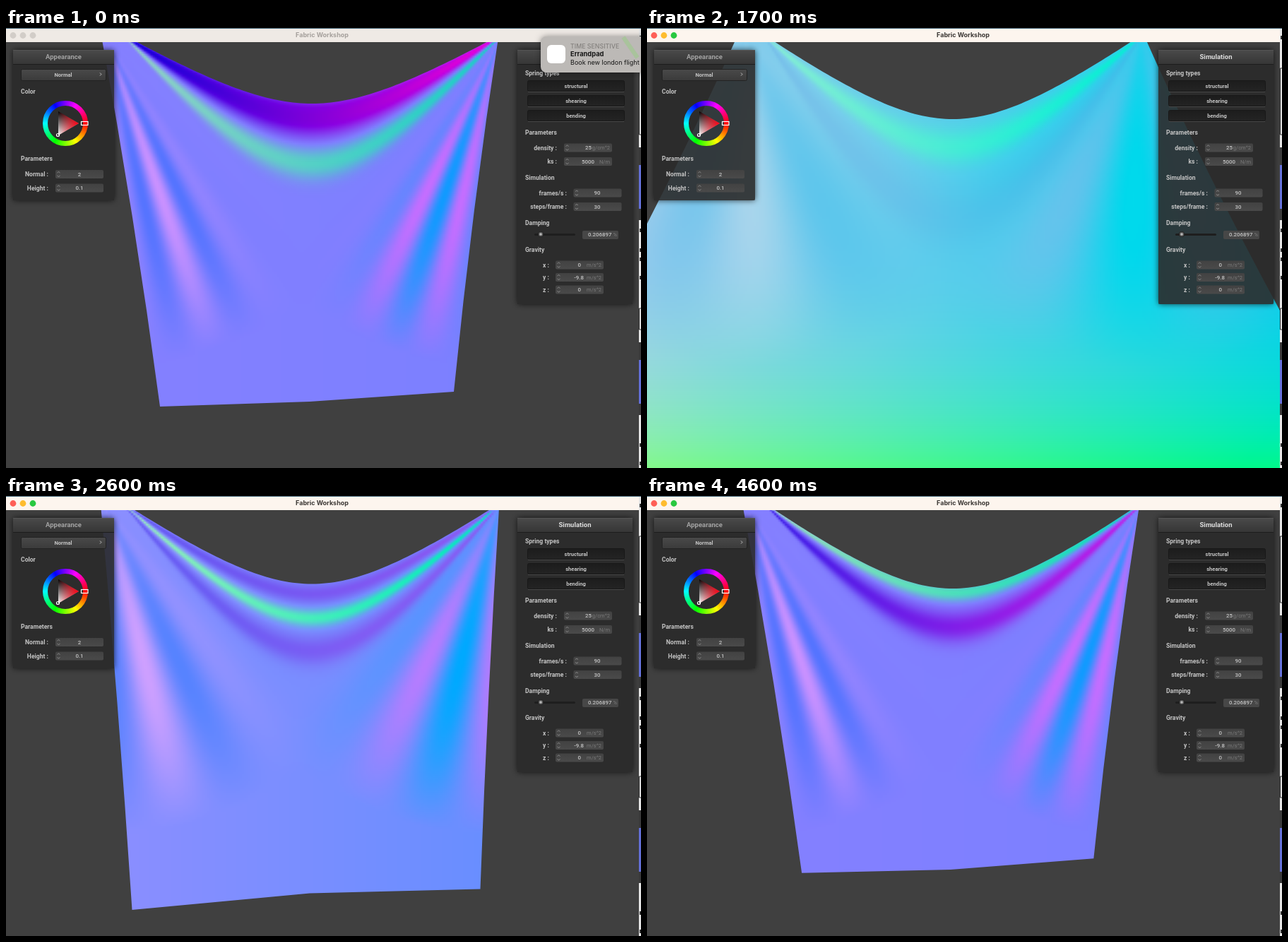
Recreate the animation shown at these times as an HTML page with a canvas. Size 899 by 623 pixels, loop 4700 ms.

```html
<!DOCTYPE html>
<html lang="en">
<head>
<meta charset="utf-8">
<title>Fabric Workshop</title>
<style>
html, body { margin: 0; width: 899px; height: 623px; overflow: hidden; background: #404040; }
canvas { display: block; }
</style>
</head>
<body>
<canvas id="stage" width="899" height="623"></canvas>
<script>
const ctx = document.getElementById('stage').getContext('2d');
const LOOP = 4700, STEP = 100, RESET = 1100, FOCUS = 900;
const UI = 'Roboto, "Open Sans", sans-serif', SYS = 'Inter, Roboto, sans-serif';
const LABEL = `700 8.6px ${UI}`, BUTTON = `700 7.6px ${UI}`;
const VALUE = `500 7.9px ${UI}`, UNIT = `400 7.5px ${UI}`;

// ---- Cloth poses ----
// left, mid, right: lower edge; bow: how far the sides curve inwards; rim: depth of the upper edge.
// crest, width, up, peak, low: the ripple below the rim (trough, crest, trough).
// fold, ray: strength and angle of the folds that fan out from the pins.
// tilt, spread, lean: how far the surface faces up, sideways, and up near the floor.
const hanging = {
  left: [218, 536], mid: [430, 529], right: [634, 515], bow: 7, rim: 131,
  crest: 137, width: 12, up: 0, peak: .9, low: .9,
  fold: 1, ray: .335, tilt: 0, spread: .06, lean: 0
};
const early = { ...hanging, rim: 107, crest: 192, width: 22, up: 1.5, peak: .75, low: 0 };
const level = {
  ...hanging, left: [-1500, 168], mid: [435, 226], right: [2400, 183], bow: 0, rim: 0,
  crest: 60, width: 25, peak: 0, low: 0, fold: 0, ray: 0, tilt: 1, spread: 0
};
const raised = { ...level, left: [-1500, -62], mid: [435, -4], right: [2400, -47] };
const falling = {
  ...hanging, left: [-303, 800], mid: [430, 800], right: [1133, 800], bow: 40, rim: 129,
  crest: 168, width: 25, peak: .3, low: .1, fold: .5, ray: .05, tilt: .6, spread: .55, lean: .3
};
const swung = {
  ...hanging, left: [139, 636], mid: [430, 596], right: [709, 598], bow: 0, rim: 127,
  crest: 174, width: 13, up: .5, low: 0, ray: .15, tilt: .23, spread: .4
};
const swaying = { ...hanging, rim: 122, crest: 172, width: 10, up: .5 };
const resting = { ...hanging, left: [220, 532], right: [631, 512] };

function mix(a, b, p) {
  if (typeof a === 'number') return a + (b - a) * p;
  if (Array.isArray(a)) return a.map((v, i) => mix(v, b[i], p));
  return Object.fromEntries(Object.keys(a).map(k => [k, mix(a[k], b[k], p)]));
}

const linear = p => p;
const track = [
  [0, RESET, early, mix(early, resting, .15), linear],
  [RESET, 1400, raised, level, p => p * p],
  [1400, 1700, level, falling, linear],
  [1700, 2200, falling, swung, p => 1 - (1 - p) ** 1.5],
  [2200, 3000, swung, swaying, linear],
  [3000, 3800, swaying, resting, linear],
  [3800, LOOP, resting, mix(resting, hanging, .5), linear]
];

function poseAt(t) {
  const [from, to, a, b, ease] = track.find(k => t < k[1]);
  return mix(a, b, ease((t - from) / (to - from)));
}

// ---- Cloth shading: the colour of each point is its surface normal ----
const CENTRE = 433, HALF = 270, PIN_Y = 8, SOFT = .526, SCALE = 3;
const LEFT_PIN = 140, RIGHT_PIN = 700;
const bell = d => Math.exp(-d * d);
// Shape of every hanging curve: 0 in the middle, 1 at the pins.
const rise = u => (Math.hypot(SOFT, u) - SOFT) / (Math.hypot(SOFT, 1) - SOFT);

function ripple(s, p) {
  return p.peak * bell((s - p.crest) / p.width)
    - p.up * bell((s - p.crest + 3 * p.width) / (1.2 * p.width))
    - p.low * bell((s - p.crest - 4 * p.width) / (1.8 * p.width));
}

function fan(dx, dy, p) {
  const r = Math.hypot(dx, dy);
  if (r > 470) return 0;
  const period = 2 * (.45 - p.ray), d = (Math.atan2(dx, dy) - p.ray) / period;
  return p.fold * Math.sin(Math.PI * r / 470) * Math.cos(2 * Math.PI * d) * bell(d / .75);
}

function normal(x, y, p) {
  const u = (x - CENTRE) / HALF, side = (x - 450) / 450;
  const depth = Math.abs(u) < 1 ? PIN_Y + (y - PIN_Y) / (1 - rise(u)) : Infinity;
  const wave = ripple(depth, p);
  const left = .55 * fan(x - LEFT_PIN, y - 10, p);
  const right = -.85 * fan(RIGHT_PIN - x, y - 10, p);
  const tilt = p.tilt + p.lean * Math.max(0, (y - 300) / 300) ** 2;
  return [
    -.55 * tilt - p.spread * side - .65 * u * wave - .45 * Math.max(wave, 0) + left + right,
    tilt + .85 * wave + .25 * (left - right),
    1 - 1.14 * tilt ** 4 - .4 * Math.abs(wave) - .2 * wave
  ];
}

const shade = document.createElement('canvas');
shade.width = 300;
shade.height = 208;
const shadeCtx = shade.getContext('2d');
const image = shadeCtx.createImageData(shade.width, shade.height);

function cloth(p) {
  for (let j = 0, k = 0; j < shade.height; j++)
    for (let i = 0; i < shade.width; i++) {
      for (const n of normal((i + .5) * SCALE, (j + .5) * SCALE, p)) image.data[k++] = 127.5 + 127.5 * n;
      image.data[k++] = 255;
    }
  shadeCtx.putImageData(image, 0, 0);

  const top = [133, 0], end = [699, 0];
  const bend = (a, b, shift) => [(a[0] + b[0]) / 2 + shift, (a[1] + b[1]) / 2];
  ctx.save();
  ctx.beginPath();
  ctx.moveTo(...top);
  for (let u = -1; u <= 1; u += .02)
    ctx.lineTo(CENTRE + HALF * u, p.rim - (p.rim - PIN_Y) * rise(u));
  ctx.lineTo(...end);
  ctx.quadraticCurveTo(...bend(end, p.right, -p.bow), ...p.right);
  ctx.lineTo(...p.mid);
  ctx.lineTo(...p.left);
  ctx.quadraticCurveTo(...bend(p.left, top, p.bow), ...top);
  ctx.clip();
  ctx.drawImage(shade, 0, 0, shade.width * SCALE, shade.height * SCALE);
  ctx.restore();
}

// ---- Interface ----
function text(s, x, y, colour = '#c4c4c4', align = 'left', font = LABEL) {
  ctx.font = font;
  ctx.fillStyle = colour;
  ctx.textAlign = align;
  ctx.textBaseline = 'middle';
  ctx.fillText(s, x, y + .5);
}

function box(x, y, w, h, fill, r = 0, stroke) {
  ctx.beginPath();
  ctx.roundRect(x, y, w, h, r);
  ctx.fillStyle = fill;
  ctx.fill();
  if (stroke) { ctx.strokeStyle = stroke; ctx.lineWidth = 1; ctx.stroke(); }
}

function dot(x, y, r, fill) {
  ctx.beginPath();
  ctx.arc(x, y, r, 0, 7);
  ctx.fillStyle = fill;
  ctx.fill();
}

function line(colour, width, ...points) {
  ctx.beginPath();
  points.forEach(p => ctx.lineTo(...p));
  ctx.strokeStyle = colour;
  ctx.lineWidth = width;
  ctx.stroke();
}

function fade(y0, y1, a, b) {
  const g = ctx.createLinearGradient(0, y0, 0, y1);
  g.addColorStop(0, a);
  g.addColorStop(1, b);
  return g;
}

function panel(x, w, h, title, colour) {
  const y = 31;
  ctx.save();
  // The shadow is drawn only outside the translucent panel.
  ctx.beginPath();
  ctx.rect(0, 0, 899, 623);
  ctx.roundRect(x, y, w, h, 2);
  ctx.clip('evenodd');
  ctx.shadowColor = 'rgba(0,0,0,.7)';
  ctx.shadowBlur = 8;
  box(x, y, w, h, '#000', 2);
  ctx.restore();
  box(x, y, w, h, 'rgba(43,43,43,.9)', 2);
  box(x, y, w, 20, fade(y, y + 20, '#4a4a4a', '#363636'), [2, 2, 0, 0]);
  line('#555', 1, [x, y + .5], [x + w, y + .5]);
  line('#1d1d1d', 1, [x, y + 20.5], [x + w, y + 20.5]);
  text(title, x + w / 2, 41, colour, 'center', `700 9.5px ${UI}`);
}

function field(label, labelX, x, y, value, valueX, align = 'center', unit = '', unitX = 0) {
  text(label + ' :', labelX, y, '#c4c4c4', 'right');
  box(x, y - 6, 68, 12, fade(y - 6, y + 6, '#424242', '#4a4a4a'), 2);
  for (const d of [-1, 1])
    line('#999', .8, [x + 2.5, y + 2 * d], [x + 4.5, y + 3.5 * d], [x + 6.5, y + 2 * d]);
  text(value, valueX, y, '#c4c4c4', align, VALUE);
  text(unit, unitX, y, '#797979', 'right', UNIT);
}

function wheel(x, y) {
  const hue = ctx.createConicGradient(0, x, y);
  for (let i = 0; i <= 12; i++) hue.addColorStop(i / 12, `hsl(${i * 30},100%,50%)`);
  ctx.beginPath();
  ctx.arc(x, y, 28.5, 0, 7);
  ctx.lineWidth = 7;
  ctx.strokeStyle = hue;
  ctx.stroke();

  const red = ctx.createLinearGradient(x - 10, 0, x + 19, 0);
  red.addColorStop(0, 'rgba(255,0,20,0)');
  red.addColorStop(1, 'rgb(255,0,20)');
  ctx.beginPath();
  ctx.moveTo(x + 19, y);
  ctx.lineTo(x - 10, y - 17);
  ctx.lineTo(x - 10, y + 17);
  for (const fill of [fade(y - 17, y + 17, '#000', '#fff'), red]) {
    ctx.fillStyle = fill;
    ctx.fill();
  }
  ctx.strokeStyle = '#fff';
  ctx.lineWidth = 1.2;
  ctx.strokeRect(x + 22.5, y - 2.5, 9.5, 5);
  ctx.beginPath();
  ctx.arc(x - 10.5, y + 16.5, 2, 0, 7);
  ctx.stroke();
}

function appearance() {
  panel(10, 143, 213, 'Appearance', '#a3a3a3');
  box(21.5, 58.5, 120, 16, fade(58, 75, '#4a4a4a', '#3a3a3a'), 2, '#222');
  text('Normal', 81, 66, '#c4c4c4', 'center', BUTTON);
  line('#c4c4c4', 1, [133, 63.5], [135, 65.5], [133, 67.5]);
  text('Color', 21, 90);
  wheel(84, 135);
  text('Parameters', 21, 185);
  field('Normal', 60, 70, 207, '2', 104);
  field('Height', 60, 70, 226.5, '0.1', 104);
}

function simulation() {
  panel(724, 163, 360, 'Simulation', '#dedede');
  text('Spring types', 735, 64);
  ['structural', 'shearing', 'bending'].forEach((s, i) => {
    const y = 74 + 21 * i;
    box(738.5, y + .5, 137, 15, fade(y, y + 16, '#1c1c1c', '#242424'), 2, '#181818');
    line('#484848', 1, [739, y + 16.5], [875, y + 16.5]);
    text(s, 807, y + 8, '#c4c4c4', 'center', BUTTON);
  });
  text('Parameters', 735, 148);
  field('density', 780, 790, 169.5, '25', 829, 'right', 'g/cm^2', 855);
  field('ks', 780, 790, 189, '5000', 833, 'right', 'N/m', 855);
  text('Simulation', 735, 212);
  field('frames/s', 794, 803.5, 233.5, '90', 837);
  field('steps/frame', 794, 803.5, 253, '30', 837);
  text('Damping', 735, 276);
  box(748, 291, 58, 3, '#1e1e1e', 1.5);
  dot(757, 292, 4, '#222');
  dot(757, 292, 3.2, '#555');
  dot(757, 292, 1.8, '#bbb');
  box(816, 287, 51, 12, '#474747', 2);
  text('0.206897', 857.5, 292.5, '#c4c4c4', 'right', VALUE);
  text('%', 865, 292.5, '#797979', 'right', UNIT);
  text('Gravity', 735, 314);
  ['0', '-9.8', '0'].forEach((v, i) =>
    field('xyz'[i], 769, 778, 335.5 + 17.5 * i, v, i === 1 ? 818 : 814, 'right', 'm/s^2', 843));
}

// A sliver of the page behind the window.
function backdrop() {
  box(896, 0, 3, 623, '#e6e6e6');
  for (const y of [194, 470]) {
    box(896, y - 25, 3, 103, '#3a3a3a');
    box(896, y, 3, 62, '#6470d8');
  }
  for (const [y, h] of [[57, 94], [397, 30]]) box(896.5, y, 4, h, '#ddd', 0, '#333');
  for (const y of [14, 287, 315, 328, 354, 591, 617]) box(897, y - 3, 2, 5, '#333');
}

function titleBar(active) {
  box(0, 0, 896, 20, active ? '#fdf5ee' : '#efeae5');
  box(0, 0, 899, 1, '#3d5f73');
  const lights = active ? ['#fe5f57', '#febc2e', '#28c840'] : Array(3).fill('#d2cdc8');
  lights.forEach((c, i) => dot(10 + 14 * i, 10.5, 4.4, c));
  text('Fabric Workshop', 447.5, 10, active ? '#3b3835' : '#a5a09c', 'center', `700 9px ${SYS}`);
}

function banner(t) {
  const x = 757 + 150 * Math.max(0, (t - 100) / 400) ** 2;
  if (x > 899) return;
  ctx.save();
  ctx.shadowColor = 'rgba(0,0,0,.4)';
  ctx.shadowBlur = 8;
  box(x, 12, 190, 51, '#bcb9b6', 8);
  ctx.restore();
  line('rgba(150,205,130,.5)', 6, [x + 117, 13], [x + 137, 42]);
  box(x + 9, 24, 26, 26, '#fff', 6);
  text('TIME SENSITIVE', x + 42, 26, '#85827f', 'left', `500 8.8px ${SYS}`);
  text('Errandpad', x + 42, 37, '#161616', 'left', `700 9.3px ${SYS}`);
  text('Book new london flight', x + 42, 48.5, '#161616', 'left', `400 9px ${SYS}`);
}

function draw(t) {
  box(0, 0, 899, 623, '#404040');
  cloth(poseAt(t));
  appearance();
  simulation();
  backdrop();
  titleBar(t >= FOCUS);
  banner(t);
}

let shown = -1;
const start = performance.now();
function tick() {
  const t = Math.floor((performance.now() - start) % LOOP / STEP) * STEP;
  if (t !== shown) draw(shown = t);
  requestAnimationFrame(tick);
}
tick();
</script>
</body>
</html>
```
